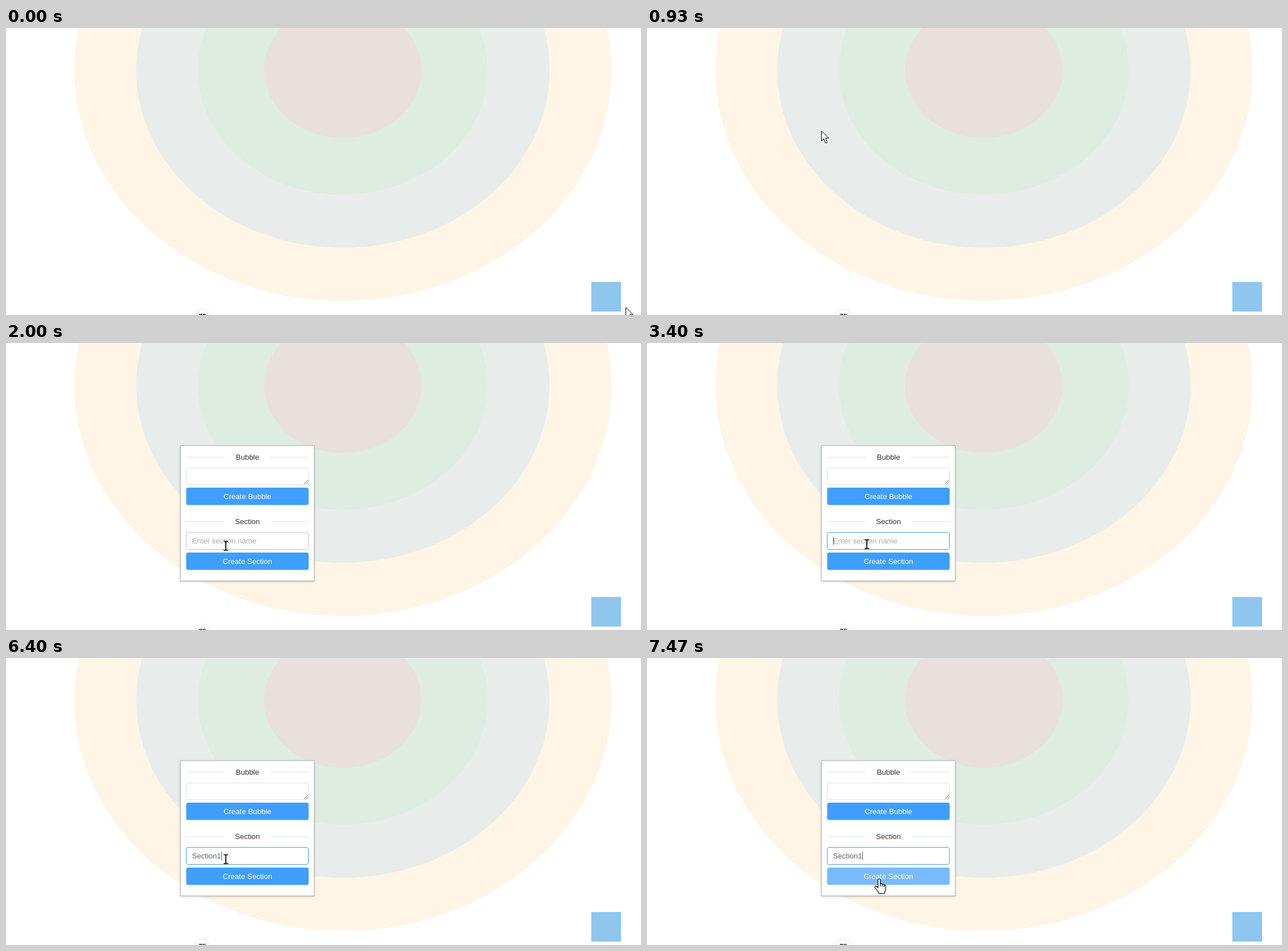
These frames come from a looping animation (1112 px wide and 504 px high, 8000 ms). An HTML page:

```html
<!DOCTYPE html>
<html lang="en">
<head>
<meta charset="utf-8">
<title>Create section</title>
<style>
  html, body { margin: 0; width: 100%; height: 100%; overflow: hidden; background: #fff; }
  svg { display: block; width: 1112px; height: 504px; }
  text { font: 13.1px "Liberation Sans", Arial, sans-serif; fill: #303133; }
  .mid { text-anchor: middle; }
  .light { fill: #fff; }
  .field { fill: #fff; stroke: #dcdfe6; }
  .rule { stroke: #dcdfe6; }
  .panel { fill: #fff; stroke: #bdbdbd;
    filter: drop-shadow(0 1px 2px rgba(0,0,0,.16)) drop-shadow(0 1px 1px rgba(0,0,0,.1)); }
</style>
</head>
<body>
<svg viewBox="0 0 1112 504">
  <g>
    <ellipse cx="590" cy="74" rx="470.5" ry="405.5" fill="#fff5e6"/>
    <ellipse cx="590" cy="74" rx="362" ry="312" fill="#e8edeb"/>
    <ellipse cx="589.8" cy="74" rx="253.7" ry="218.6" fill="#deece1"/>
    <ellipse cx="589.8" cy="74" rx="137.7" ry="119" fill="#e8e0dc"/>
  </g>
  <rect x="1025" y="446" width="52" height="52" fill="#8fc6ee"/>
  <circle cx="344" cy="508.5" r="15" fill="#fff" stroke="#e4e4e4"/>
  <text class="mid" x="344" y="510.5" style="font-size:12px;font-weight:bold">75</text>

  <g id="menu">
    <rect class="panel" x="305.5" y="180.5" width="234" height="237"/>
    <path class="rule" d="M316 200.5H383M462.5 200.5H530M316 313.5H382M464 313.5H530"/>
    <text class="mid" x="422.8" y="205">Bubble</text>
    <text class="mid" x="422.8" y="318">Section</text>
    <rect id="area" class="field" x="315.5" y="219.5" width="214" height="29" rx="3.5"/>
    <path d="M522 247.5L529 240.5M526 247.5L529 244.5" stroke="#555"/>
    <rect id="bubble" x="315.5" y="254" width="214.5" height="30.5" rx="3.5"/>
    <text class="mid light" x="422.8" y="274">Create Bubble</text>
    <rect id="name" class="field" x="315.5" y="332.5" width="214" height="30" rx="3.5"/>
    <text id="typed" x="325.7" y="352"></text>
    <path id="caret" d="M.5 340V355" stroke="#606266"/>
    <rect id="section" x="315.5" y="368" width="214.5" height="30.5" rx="3.5"/>
    <text class="mid light" x="422.8" y="388">Create Section</text>
  </g>

  <g id="pointer">
    <path id="arrow" d="M.5.8V18.3L4.5 14.6 7.6 22.2 10.8 20.8 7.7 13.3H13Z" fill="#fff" stroke="#000"/>
    <path id="beam" d="M-4-7.5H-1L0-6.5 1-7.5H4M0-7V7.5M-4 8H-1L0 7 1 8H4" fill="none" stroke="#000" stroke-width="1.7"/>
    <g id="hand" stroke="#000" stroke-width="1.2" stroke-linejoin="round">
      <path d="M-2.5 15V2a2 2 0 0 1 4 0V9a2 2 0 0 1 3.5.7 2 2 0 0 1 3.3 1 1.8 1.8 0 0 1 2.7 1.6V18q0 3-2 5V25.5H-1V24L-7.5 15.5q-1.5-2.5.5-3 1.5-.3 4.5 2.5z" fill="#fff"/>
      <path d="M1.5 9V13M5 9.7V13.5M8.3 10.7V14"/>
    </g>
  </g>
</svg>
<script>
const $ = id => document.getElementById(id);
const LOOP = 8000, FPS = 15, OPEN = 20, FOCUS = 35, BLINK = 8;
const WORD = "Section1", KEYS = [60, 64, 70, 76, 81, 85, 87, 96];

// Pointer moves: start step, end step, target x and y
const MOVES = [[0, 13, 305, 181], [13, 14, 305, 180], [20, 30, 385, 356],
               [35, 40, 385, 353], [103, 110, 407, 388]];
const WHITE_BLUE = [64, 158, 255], HOVER_BLUE = [121, 187, 255];
const GREY = [220, 223, 230], HOVER_GREY = [192, 196, 204];
const TOP = { area: 219, bubble: 254, name: 332, section: 368 };

const clamp = v => Math.max(0, Math.min(1, v));
const smooth = p => p * p * (3 - 2 * p);
const mix = (a, b, p) => `rgb(${a.map((v, i) => Math.round(v + (b[i] - v) * p))})`;
const show = (id, on) => $(id).setAttribute("visibility", on ? "visible" : "hidden");

function pointerAt(n) {
  let x = 1085, y = 490;
  for (const [from, to, tx, ty] of MOVES) {
    const p = smooth(clamp((n - from) / (to - from)));
    x += (tx - x) * p;
    y += (ty - y) * p;
  }
  return [Math.round(x), Math.round(y)];
}

function over(id, n) {
  const [x, y] = pointerAt(n);
  return n > OPEN && x >= 315 && x <= 530 && y >= TOP[id] && y <= TOP[id] + 30;
}

// Hover fades over two steps
const hover = (id, n) => (over(id, n) + over(id, n - 1)) / 2;

function draw(t) {
  const n = Math.floor((t + 4) * FPS / 1000);
  const [x, y] = pointerAt(n);
  show("menu", n >= OPEN);

  const border = id => mix(GREY, HOVER_GREY, hover(id, n));
  const button = id => mix(WHITE_BLUE, HOVER_BLUE, hover(id, n));
  const focus = clamp((n - FOCUS + 1) / 4);
  $("area").style.stroke = border("area");
  $("name").style.stroke = focus ? mix(HOVER_GREY, WHITE_BLUE, focus) : border("name");
  $("bubble").style.fill = button("bubble");
  $("section").style.fill = button("section");

  const count = KEYS.filter(k => k <= n).length;
  const typed = $("typed");
  typed.textContent = count ? WORD.slice(0, count) : "Enter section name";
  typed.style.fill = count ? "#606266" : "#a8abb2";
  const last = count ? KEYS[count - 1] : FOCUS;
  const width = count ? typed.getComputedTextLength() : 0;
  $("caret").setAttribute("transform", `translate(${Math.round(325.7 + width)} 0)`);
  show("caret", n >= FOCUS && Math.floor((n - last) / BLINK) % 2 === 0);

  const kind = over("area", n) || over("name", n) ? "beam"
    : over("bubble", n) || over("section", n) ? "hand" : "arrow";
  for (const id of ["arrow", "beam", "hand"]) show(id, id === kind);
  $("pointer").setAttribute("transform", `translate(${x} ${y})`);
}

const start = performance.now();
function tick() {
  draw((performance.now() - start) % LOOP);
  requestAnimationFrame(tick);
}
tick();
</script>
</body>
</html>
```
